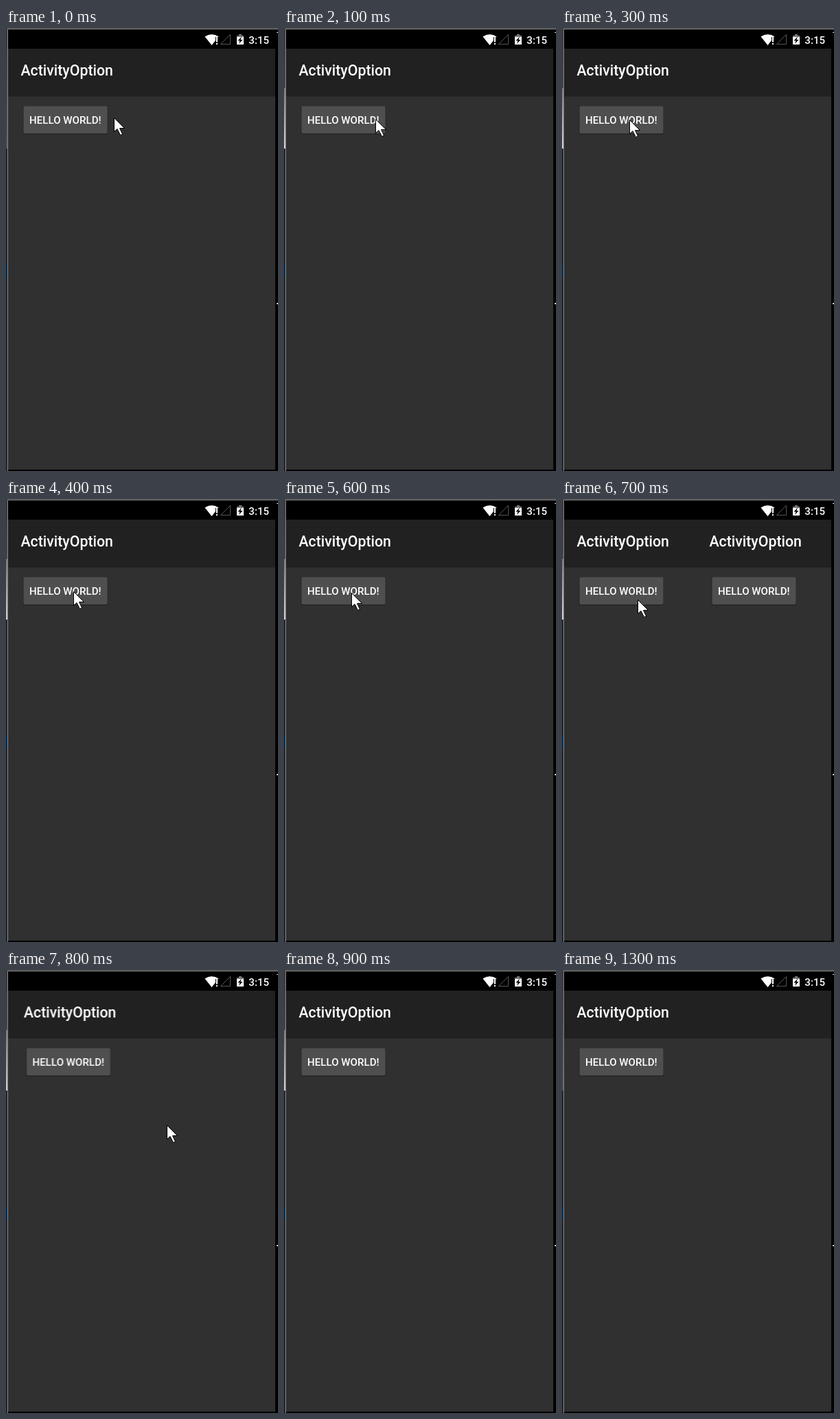
An HTML page that plays this animation: 396x643 px, repeating every 1400 ms.

```html
<!DOCTYPE html>
<html lang="en">
<head>
<meta charset="utf-8">
<title>Activity slide transition</title>
<style>
  html, body { margin: 0; width: 100%; height: 100%; overflow: hidden; background: #000; }
  svg { display: block; width: 396px; height: 643px; }
  text { font-family: Roboto, sans-serif; font-weight: 500; fill: #fff; }
  .title { font-size: 21.3px; }
  .label { font-size: 15.1px; }

  .cursor, .incoming, .glow { animation: 1400ms step-end infinite; }
  .cursor { animation-name: point; }
  .incoming { animation-name: slide; }
  .glow { animation-name: glow; }

  @keyframes point {
    0% { transform: translate(157px, 130px); }
    7.14% { transform: translate(133px, 132px); }
    14.28% { transform: translate(106px, 133px); }
    21.42% { transform: translate(98px, 133px); }
    28.57% { transform: translate(98px, 134px); }
    35.71% { transform: translate(98px, 135px); }
    42.85% { transform: translate(98px, 136px); }
    50% { transform: translate(110px, 146px); }
    57.14% { transform: translate(234px, 225px); opacity: 1; }
    64.28%, 100% { transform: translate(234px, 225px); opacity: 0; }
  }
  @keyframes slide {
    0% { transform: none; }
    50% { transform: translateX(193px); }
    57.14% { transform: translateX(4.4px); }
    64.28%, 100% { transform: none; }
  }
  @keyframes glow {
    0% { opacity: 0; }
    7.14% { opacity: 1; }
    92.85%, 100% { opacity: 0; }
  }
</style>
</head>
<body>
<svg viewBox="0 0 396 643">
  <defs>
    <linearGradient id="edge" x2="0" y2="1">
      <stop stop-color="#38383a"/>
      <stop offset="1" stop-color="#50505c"/>
    </linearGradient>
    <linearGradient id="bright" x2="0" y2="1">
      <stop stop-color="#777"/>
      <stop offset="1" stop-color="#ccc"/>
    </linearGradient>
    <clipPath id="view"><path d="M3 30H392V641H3Z"/></clipPath>
    <g id="screen">
      <path fill="#303030" d="M3 30H392V641H3Z"/>
      <path fill="#212121" d="M3 30H392V99H3Z"/>
      <path fill="#292929" d="M3 99H392V100H3Z"/>
      <text class="title" x="21.4" y="68.6">ActivityOption</text>
      <rect x="24.5" y="114" width="123.5" height="40.5" rx="2" fill="#272727"/>
      <rect x="25.5" y="113.5" width="122" height="39.5" rx="2" fill="#4f4f4f"/>
      <text class="label" x="34" y="139.3">HELLO WORLD!</text>
    </g>
  </defs>

  <path d="M0 0H396V643H0Z"/>

  <!-- desktop showing beside the window -->
  <path fill="#22262b" d="M0 175H2V643H0Z"/>
  <path fill="url(#edge)" d="M0 0H2V175H0Z"/>
  <path class="glow" fill="url(#bright)" d="M0 87H2V175H0Z"/>
  <path fill="#062c47" d="M0 344H2V363H0Z"/>
  <path fill="#444" d="M0 0H396V1H0Z"/>
  <path fill="#8a8a8a" d="M2 1H396V2H3V643H2Z"/>
  <path fill="#ddd" d="M394 6h2v1h-2zM394 399h2v2h-2z"/>

  <!-- status bar -->
  <path fill="#fff" d="M289.500 12.500Q299.500 6 309.500 12.500L299.500 25Z"/>
  <path d="M305 13H310V25H305Z"/>
  <path fill="#fff" d="M306 13h2v7.500h-2zM306 22h2v2h-2z"/>
  <path fill="none" stroke="#555" d="M312.500 23.500H326.500V9.500Z"/>
  <path fill="#777" d="M339 9H343V11H346V13H336V11H339Z"/>
  <path fill="#fff" d="M336 13H346V24H336Z"/>
  <path d="M343 12.500L337.500 18.500H340.500L339 23 344.500 17H341.500Z"/>
  <text class="label" x="353.300" y="22.500">3:15</text>

  <g clip-path="url(#view)">
    <use href="#screen"/>
    <g class="incoming"><use href="#screen"/></g>
  </g>

  <path class="cursor" fill="#fff" stroke="#000"
    d="M.5 .5V20.500L5 16.500 9.500 25.500 12.500 24 8.500 15.500H15.500Z"/>
</svg>
</body>
</html>
```
